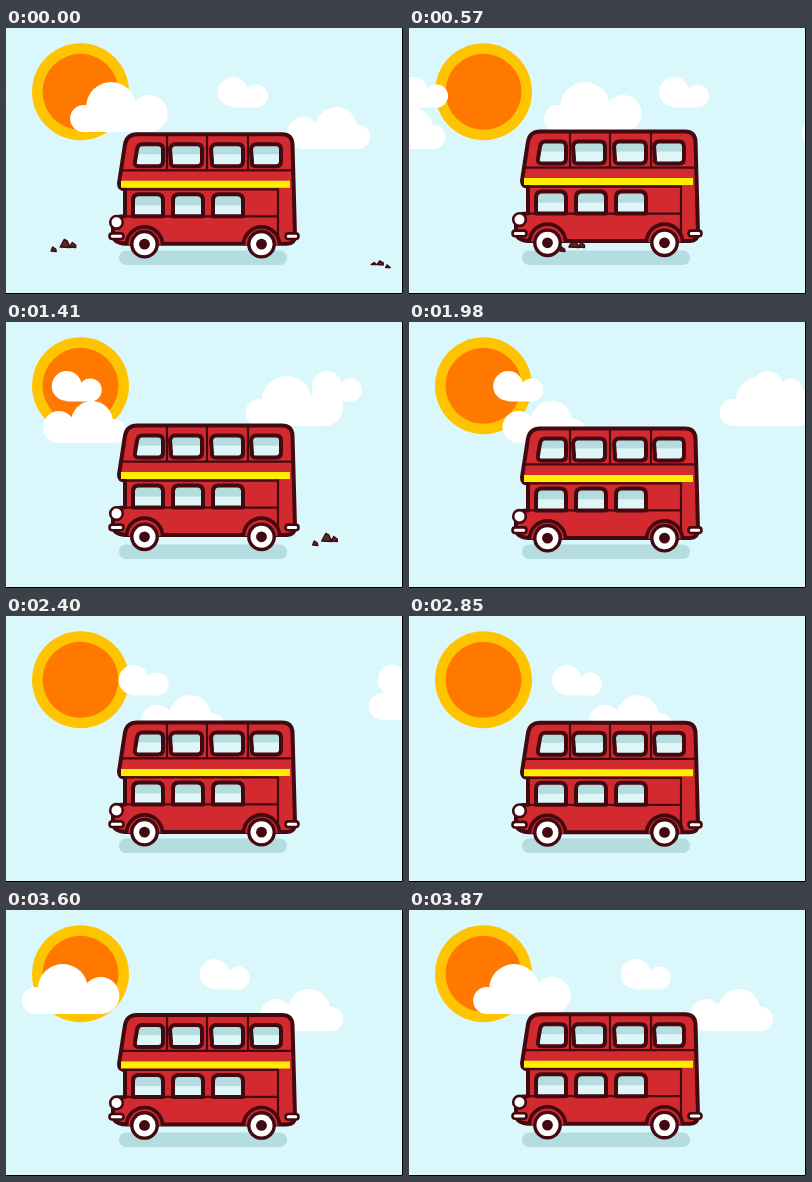
These frames come from a looping animation (397 by 266 pixels, 3900 ms). An HTML page:

```html
<!DOCTYPE html>
<html lang="en">
<head>
<meta charset="utf-8">
<title>Double-decker bus</title>
<style>
html, body { margin: 0; width: 100%; height: 100%; overflow: hidden; background: #daf7fb; }
svg { display: block; }
.line { fill: none; stroke: #420a10; stroke-width: 2.2; }
.glass { fill: #def6f8; }
.shade { fill: #b5dcdf; }
.frame { fill: none; stroke: #420a10; stroke-width: 4; stroke-linejoin: round; }
.trim { fill: #fff; stroke: #420a10; stroke-width: 2.6; }
.stones { fill: #5a2a1e; stroke: #420a10; stroke-width: 1.5; stroke-linejoin: round; }
</style>
</head>
<body>
<svg width="397" height="266" viewBox="0 0 397 266">
  <defs>
    <g id="small" fill="#fff">
      <circle cx="15" cy="64" r="15"/><circle cx="38.5" cy="68" r="11.5"/>
      <path d="M15 62H38V79.5H15Z"/>
    </g>
    <g id="big" fill="#fff">
      <circle cx="13.5" cy="90.5" r="13.5"/><circle cx="41" cy="79" r="25"/>
      <circle cx="79" cy="85.5" r="18.5"/><path d="M13.5 85H79V104H13.5Z"/>
    </g>
    <g id="low" fill="#fff">
      <circle cx="16" cy="105" r="16"/><circle cx="49" cy="100" r="21"/>
      <circle cx="71" cy="109" r="12"/><path d="M16 101H71V121H16Z"/>
    </g>
    <g id="wheel">
      <circle r="14.4" fill="#420a10"/><circle r="11" fill="#fff"/>
      <circle r="5.4" fill="#420a10"/>
    </g>
    <path id="arch" d="M-18 0A18 18 0 0 1 18 0" fill="#d32a30" stroke="#420a10" stroke-width="3.6"/>
  </defs>

  <circle cx="74.5" cy="63.8" r="48.5" fill="#ffc400"/>
  <circle cx="74.5" cy="63.8" r="38" fill="#ff7800"/>
  <g id="sky"></g>
  <rect x="113" y="222.5" width="168" height="14.5" rx="7.25" fill="#b5dde0"/>
  <g id="stones" class="stones">
    <path d="M45 223L46.5 219L49.5 221L50 223.5ZM54 219L58 211.5L61 213L64 219.5ZM63.5 219L66 214.5L69.5 217V219.5Z"/>
    <path d="M365 236.5L368 234.5L370 236.5ZM371 236.5L373.5 233L377 235V237ZM379.5 239.5L381 237L384 239.5Z"/>
  </g>

  <g id="bus">
    <path d="M131 105H276Q286 105 286.5 115L289 206Q289 214.5 281 214.5H120Q107 214 107 205V197Q107 187 117 187H119V160Q113 160 113 154L119 115Q121 105 131 105Z"
      fill="#d32a30" stroke="#420a10" stroke-width="4" stroke-linejoin="round"/>
    <path class="line" d="M117 141H287M161 106V141M201 106V141M242 106V141M118 187H272V159M272 187V214"/>
    <path d="M115 151.5H284V158.5H115Z" fill="#ffee00"/>
    <path class="line" d="M119 160H272"/>
    <g id="windows"></g>
    <use href="#arch" x="138.5" y="215.5"/>
    <use href="#arch" x="255.5" y="215.5"/>
    <circle class="trim" cx="110.5" cy="193" r="6.3"/>
    <rect class="trim" x="103.5" y="204" width="14" height="5.6" rx="2.8"/>
    <rect class="trim" x="279.5" y="204" width="13" height="5.6" rx="2.8"/>
  </g>
  <g id="wheels">
    <use href="#wheel" x="138.5" y="215.5"/>
    <use href="#wheel" x="255.5" y="215.5"/>
  </g>
  <path d="M0 265.5H396.5V0" fill="none" stroke="#000"/>
</svg>
<script>
const LOOP = 3900;
const $ = id => document.getElementById(id);

function addWindow(outline, x, y, w, split) {
  const id = "w" + x + y;
  return `<clipPath id="${id}"><path d="${outline}"/></clipPath>
    <path class="glass" d="${outline}"/>
    <rect class="shade" clip-path="url(#${id})" x="${x}" y="${y}" width="${w}" height="${split}"/>
    <path class="frame" d="${outline}"/>`;
}

const upper = [[129, 28, 3], [165, 31, 0], [206, 31, 0], [246, 29, 0]].map(([x, w, slant]) =>
  addWindow(`M${x + slant + 4} 115H${x + w - 5}Q${x + w} 115 ${x + w} 120V132Q${x + w} 137 ${x + w - 5} 137H${x + 4}Q${x - 1} 137 ${x} 132L${x + slant - 1} 120Q${x + slant} 115 ${x + slant + 4} 115Z`,
    x, 114, w, 11));
const lower = [127, 167, 207].map(x =>
  addWindow(`M${x} 187V171Q${x} 165 ${x + 6} 165H${x + 24}Q${x + 30} 165 ${x + 30} 171V187Z`,
    x, 164, 30, 12));
$("windows").innerHTML = upper.concat(lower).join("");

function cloud(shape) {
  const use = document.createElementNS("http://www.w3.org/2000/svg", "use");
  use.setAttribute("href", "#" + shape);
  $("sky").append(use);
  return x => use.setAttribute("x", x);
}

// Each cloud leaves on the right while its successor enters from the left.
const clouds = [
  [cloud("low"), t => 281 + 0.196 * t],
  [cloud("low"), t => -103 + 0.0992 * t],
  [cloud("big"), t => 64 + 0.1245 * t],
  [cloud("big"), t => 64 + 0.179 * (t - 3870)],
  [cloud("small"), t => 212 + 0.0665 * t],
  [cloud("small"), t => -49.5 + 0.0675 * t]
];

const shift = (id, x, y) => $(id).setAttribute("transform", `translate(${x} ${y})`);

function draw(now) {
  const t = now % LOOP;
  for (const [place, path] of clouds) place(path(t));
  shift("stones", 0.1855 * t, 0);
  const bounce = 1.7 * Math.cos((t + 60) / 420 * 2 * Math.PI) + 0.3;
  shift("bus", 0, bounce);
  shift("wheels", 0, bounce / 2);
}

const start = performance.now();
function tick() {
  draw(performance.now() - start);
  requestAnimationFrame(tick);
}
tick();
</script>
</body>
</html>
```
